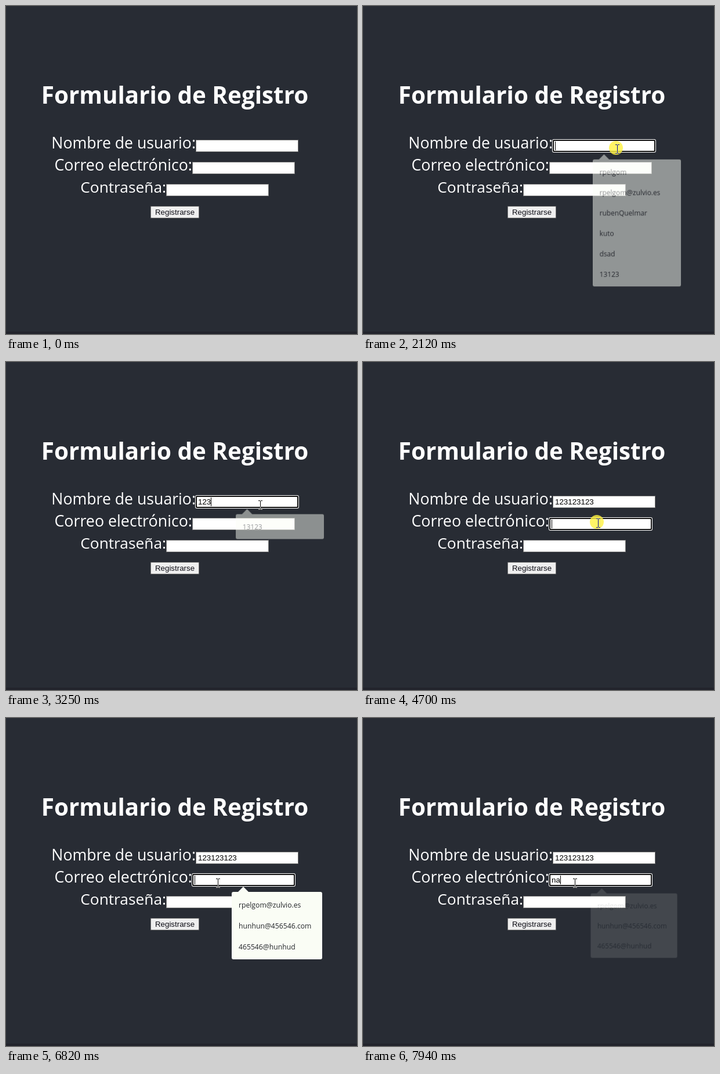
An HTML page with a canvas that plays this animation: 605 by 564 pixels, repeating every 8 s.

```html
<!DOCTYPE html>
<html lang="es">
<head>
<meta charset="utf-8">
<title>Formulario de Registro</title>
<style>
  html, body { margin: 0; width: 100%; height: 100%; overflow: hidden; background: #282c34; }
  canvas { display: block; }
</style>
</head>
<body>
<canvas id="stage" width="605" height="564"></canvas>
<script>
const LOOP = 8000;
const SANS = '"Open Sans", "Noto Sans", sans-serif';
const FORM = '13.333px "Liberation Sans", Arial, sans-serif';
const ctx = document.getElementById('stage').getContext('2d');
const layer = document.createElement('canvas');
layer.width = 605;
layer.height = 564;
const layerCtx = layer.getContext('2d');

const fields = [
  { label: 'Nombre de usuario:', size: 26.65, x: 327, y: 230 },
  { label: 'Correo electrónico:', size: 26.8, x: 321, y: 268 },
  { label: 'Contraseña:', size: 26.3, x: 276, y: 306 }
];
const FIELD_W = 177, FIELD_H = 21;

const userItems = ['rpelgom', 'rpelgom@zulvio.es', 'rubenQuelmar', 'kuto', 'dsad', '13123'];
const mailItems = ['rpelgom@zulvio.es', 'hunhun@456546.com', '465546@hunhud'];

const USER_CLICK = 1870, MAIL_CLICK = 4700;
const userKeys = [2900, 3080, 3230, 3430, 3650, 3820, 4060, 4230, 4430];
const mailKeys = [7600, 7770];

// time, x, y of the pointer
const path = [
  [120, 575, 552], [450, 524, 400], [700, 481, 290], [880, 470, 238],
  [980, 467, 235], [1160, 460, 228], [1370, 449, 222], [1600, 439, 235],
  [1770, 438, 245], [3700, 438, 245], [4380, 405, 276], [4760, 405, 276],
  [5500, 388, 289], [5800, 386, 299], [6300, 369, 284], [6400, 365, 283],
  [LOOP, 365, 283]
];

const clamp = v => Math.max(0, Math.min(1, v));
const typed = (text, keys, t) => text.slice(0, keys.filter(k => k <= t).length);

function pointerAt(t) {
  const i = path.findIndex(p => p[0] > t);
  const [t0, x0, y0] = path[i - 1], [t1, x1, y1] = path[i];
  const k = (t - t0) / (t1 - t0);
  return { x: Math.round(x0 + (x1 - x0) * k), y: Math.round(y0 + (y1 - y0) * k) };
}

function rounded(c, x, y, w, h, r, color) {
  c.fillStyle = color;
  c.beginPath();
  c.roundRect(x, y, w, h, r);
  c.fill();
}

function text(c, str, x, y, font, color, align = 'left') {
  c.font = font;
  c.fillStyle = color;
  c.textAlign = align;
  c.fillText(str, x, y);
}

function drawField({ label, size, x, y }, value, focused, hovered, caret) {
  text(ctx, label, x, y + 15, `${size}px ${SANS}`, '#fff', 'right');
  if (focused) {
    rounded(ctx, x - 1, y - 1, FIELD_W + 2, FIELD_H + 2, 3, '#fff');
    rounded(ctx, x, y, FIELD_W, FIELD_H, 2, '#101010');
    rounded(ctx, x + 2, y + 2, FIELD_W - 4, FIELD_H - 4, 1, '#fff');
  } else {
    rounded(ctx, x, y, FIELD_W, FIELD_H, 0, hovered ? '#4f4f4f' : '#767676');
    rounded(ctx, x + 1, y + 1, FIELD_W - 2, FIELD_H - 2, 0, '#fff');
  }
  text(ctx, value, x + 4, y + 15, FORM, '#000');
  if (focused && caret) {
    ctx.fillStyle = '#000';
    ctx.fillRect(x + 4 + Math.round(ctx.measureText(value).width), y + 3, 1, 15);
  }
}

// The popup is composed on its own layer so that it fades as one piece.
function drawPopup(x, y, items, alpha) {
  if (alpha <= 0) return;
  const w = 156, h = 8 + 36 * items.length;
  layerCtx.clearRect(0, 0, layer.width, layer.height);
  rounded(layerCtx, x, y, w, h, 3, '#fafdf5');
  layerCtx.beginPath();
  layerCtx.moveTo(x + 11, y);
  layerCtx.lineTo(x + 20, y - 9);
  layerCtx.lineTo(x + 29, y);
  layerCtx.fill();
  items.forEach((item, i) =>
    text(layerCtx, item, x + 12, y + 27 + 36 * i, `12.2px ${SANS}`, '#23252a'));

  const scale = 1 - 0.05 * (1 - alpha), cx = x + w / 2, cy = y + h / 2;
  ctx.save();
  ctx.globalAlpha = alpha;
  ctx.translate(cx, cy);
  ctx.scale(scale, scale);
  ctx.drawImage(layer, -cx, -cy);
  ctx.restore();
}

function popupAlpha(t, click, close) {
  const shown = clamp((t - click - 150) / 200);
  const left = 1 - clamp((t - close) / 520);
  return shown * left * left;
}

function drawClick(t, click, { x, y }) {
  if (t < click || t >= click + 300) return;
  ctx.fillStyle = 'rgba(255, 242, 64, 0.8)';
  ctx.beginPath();
  ctx.arc(x - 2, y - 1, 12, 0, Math.PI * 2);
  ctx.fill();
}

function drawBeam({ x, y }) {
  ctx.save();
  ctx.globalCompositeOperation = 'difference';
  ctx.fillStyle = '#fff';
  ctx.fillRect(x, y - 6, 1, 14);
  for (const edge of [y - 7, y + 8]) {
    ctx.fillRect(x - 3, edge, 3, 1);
    ctx.fillRect(x + 1, edge, 3, 1);
  }
  ctx.restore();
}

function drawArrow({ x, y }) {
  ctx.save();
  ctx.translate(x + 0.5, y + 0.5);
  ctx.beginPath();
  [[0, 0], [0, 16], [4, 12.5], [6.5, 18], [9, 17], [6.5, 11.5], [11, 11]]
    .forEach(p => ctx.lineTo(...p));
  ctx.closePath();
  ctx.fillStyle = '#fff';
  ctx.fill();
  ctx.strokeStyle = '#000';
  ctx.lineWidth = 1;
  ctx.stroke();
  ctx.restore();
}

function caretOn(t) {
  if (t < 2740) return true;
  if (t < userKeys[0]) return false;
  if (t < MAIL_CLICK || t >= mailKeys[0]) return true;
  if (t >= 7250) return false;
  return Math.floor((t - MAIL_CLICK) / 530) % 2 === 0;
}

function draw(t) {
  ctx.fillStyle = '#282c34';
  ctx.fillRect(0, 0, 605, 564);
  ctx.fillStyle = '#22242c';
  ctx.fillRect(0, 560, 605, 4);
  text(ctx, 'Formulario de Registro', 291, 168, `bold 40.4px ${SANS}`, '#fff', 'center');

  const pointer = t >= path[0][0] ? pointerAt(t) : null;
  const inside = f => pointer && pointer.x >= f.x && pointer.x < f.x + FIELD_W &&
    pointer.y >= f.y && pointer.y < f.y + FIELD_H;
  const focus = t >= MAIL_CLICK ? 1 : t >= USER_CLICK ? 0 : -1;
  const values = [typed('123123123', userKeys, t), typed('na', mailKeys, t), ''];
  fields.forEach((f, i) => drawField(f, values[i], i === focus, inside(f), caretOn(t)));

  rounded(ctx, 249, 344, 84, 21, 1, '#767676');
  rounded(ctx, 250, 345, 82, 19, 1, '#efefef');
  text(ctx, 'Registrarse', 291, 359, FORM, '#0c0c14', 'center');

  const matches = t < userKeys[0] ? userItems : userItems.slice(-1);
  drawPopup(394, 261, matches, popupAlpha(t, USER_CLICK, 3090));
  drawPopup(389, 299, mailItems, popupAlpha(t, MAIL_CLICK, 7607));

  if (!pointer) return;
  drawClick(t, USER_CLICK, pointer);
  drawClick(t, MAIL_CLICK, pointer);
  if (fields.some(inside)) drawBeam(pointer);
  else drawArrow(pointer);
}

const start = performance.now();
function frame() {
  draw((performance.now() - start) % LOOP);
  requestAnimationFrame(frame);
}
frame();
</script>
</body>
</html>
```
